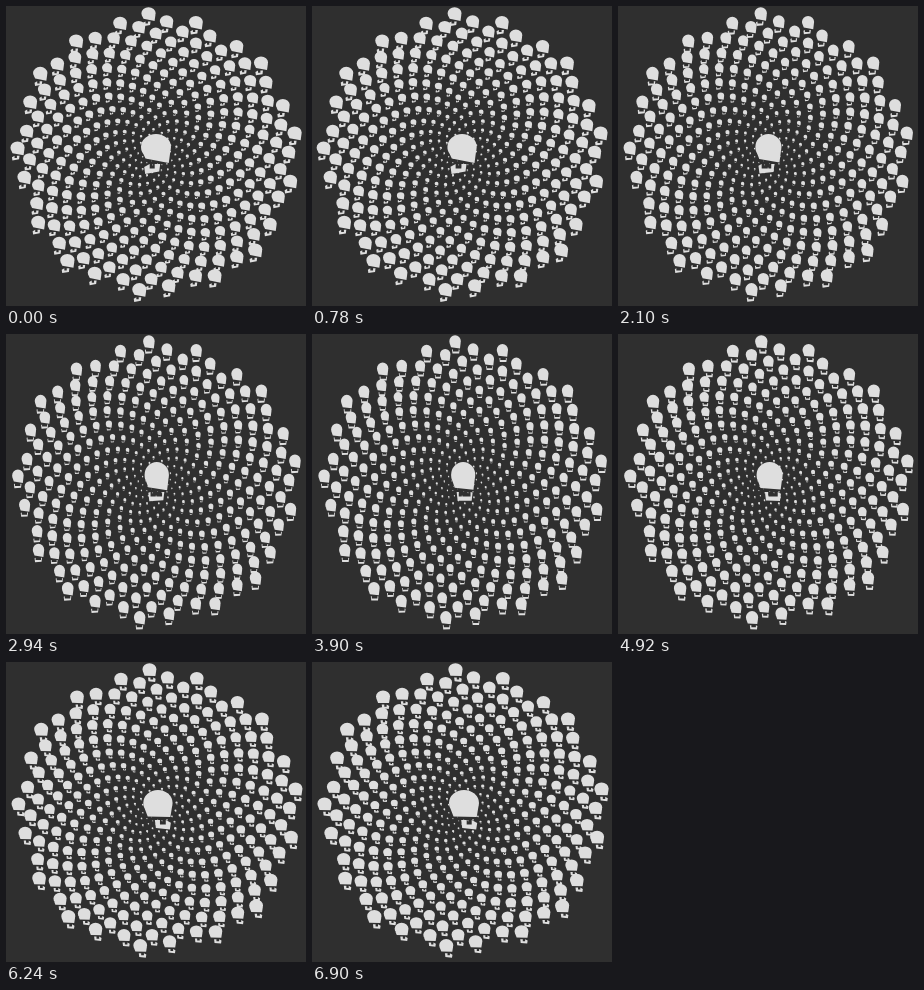
These frames come from a looping animation (300x300 px, 7.02 s). An HTML page with a canvas:

```html
<!DOCTYPE html>
<html lang="en">
<head>
<meta charset="utf-8">
<title>Skull spiral</title>
<style>
html, body { margin: 0; width: 100%; height: 100%; overflow: hidden; background: #2f2f2f; }
canvas { display: block; width: 300px; height: 300px; }
</style>
</head>
<body>
<canvas id="stage" width="300" height="300"></canvas>
<script>
const ctx = document.getElementById('stage').getContext('2d');
const LOOP = 7020, STEP = 60;
const COUNT = 400, FIRST = 20, RADIUS = 140.3, SCALE = 0.48;
const GOLDEN = Math.PI * (3 - Math.sqrt(5));

function addPolygon(path, points) {
  points.forEach(([x, y], i) => i ? path.lineTo(x, y) : path.moveTo(x, y));
  path.closePath();
}

// turn runs from -1 (one side) through 0 (front) to 1 (other side)
function skullPath(turn) {
  const path = new Path2D();
  const side = turn * turn;

  const mid = 1 + turn, half = 12 + 3 * side;
  path.ellipse(mid, -1, half, 13, 0, 0, 2 * Math.PI);
  path.closePath();
  addPolygon(path, [
    [mid - 0.97 * half, 2], [mid + 0.97 * half, 2],
    [mid + 0.85 * half, 14 - turn], [mid - 0.7 * half, 11.5 + turn]
  ]);

  const jaw = 1.7 + 5.5 * turn, post = 2 + 3.5 * side, base = 20.5;
  const left = jaw - 8, right = jaw + 8;
  addPolygon(path, [
    [left, 16 + 3 * Math.max(0, -turn)], [left + post, 16],
    [left + post, base], [right - post, base],
    [right - post, 16], [right, 16 + 3 * Math.max(0, turn)],
    [right - 1, 24.5 + turn], [left + 1, 25 - turn]
  ]);
  return path;
}

function stamp(path, x, y, size) {
  ctx.setTransform(size, 0, 0, size, x, y);
  ctx.fill(path);
}

function draw(t) {
  const path = skullPath(-Math.cos(Math.PI * t / LOOP));
  ctx.setTransform(1, 0, 0, 1, 0, 0);
  ctx.fillStyle = '#2f2f2f';
  ctx.fillRect(0, 0, 300, 300);
  ctx.fillStyle = '#dedede';
  for (let i = FIRST; i < COUNT; i++) {
    const reach = i / (COUNT - 1);
    const r = RADIUS * reach, a = -i * GOLDEN, size = SCALE * reach;
    stamp(path, 150 + r * Math.cos(a), 149.7 + r * Math.sin(a) - 6 * size, size);
  }
  stamp(path, 150, 142, 1);
}

const origin = performance.now();
function tick() {
  const t = (performance.now() - origin) % LOOP;
  draw(Math.floor(t / STEP) * STEP);
  requestAnimationFrame(tick);
}
tick();
</script>
</body>
</html>
```
